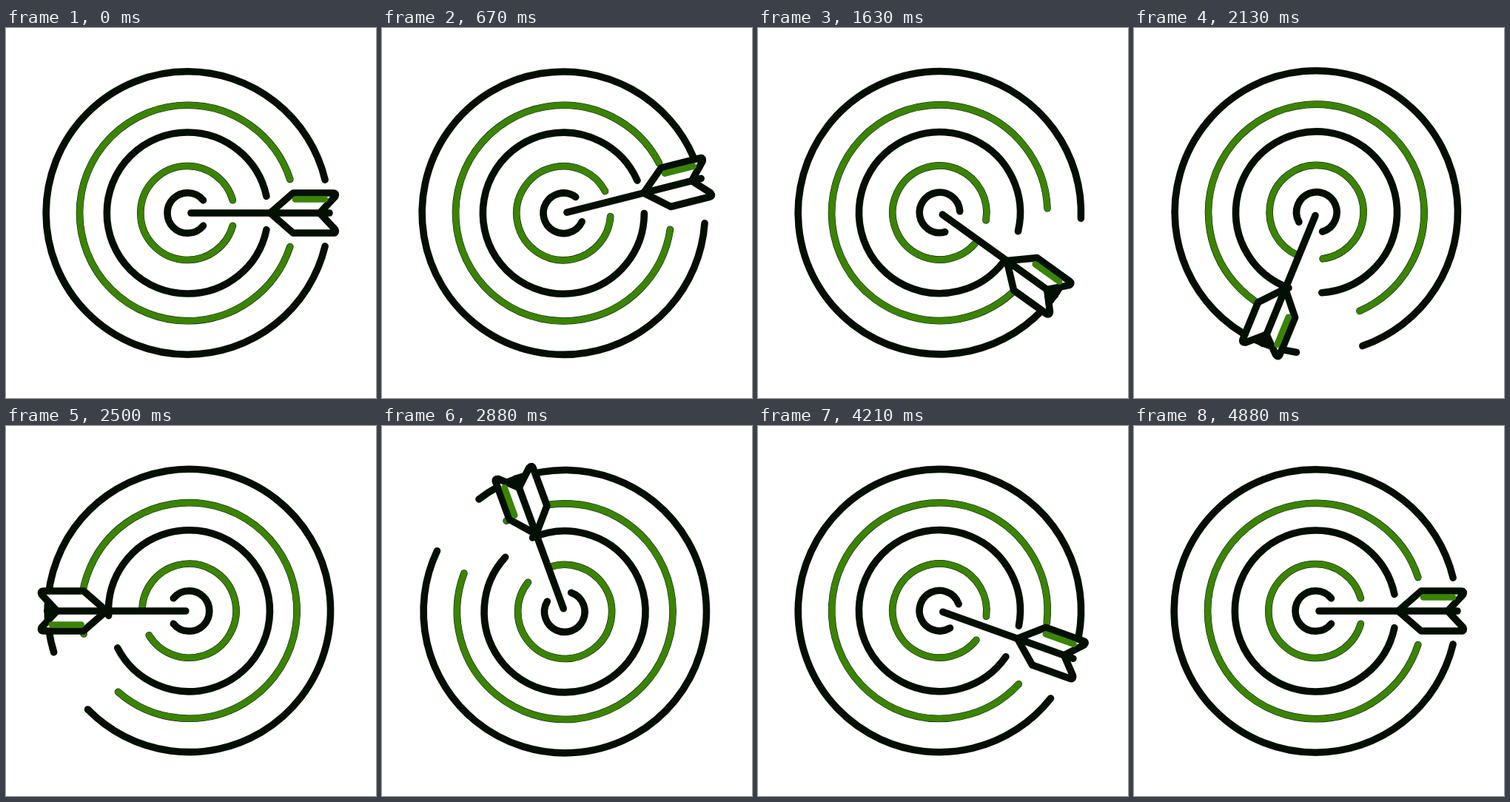
An HTML page without scripts for the animation above (5 s loop, 500 by 500 pixels).

```html
<!DOCTYPE html>
<html lang="en">
<head>
<meta charset="utf-8">
<title>Target and arrow</title>
<style>
  @property --time {
    syntax: "<number>";
    inherits: true;
    initial-value: 0;
  }

  html, body {
    margin: 0;
    width: 100%;
    height: 100%;
    overflow: hidden;
    background: #fff;
  }

  svg {
    display: block;
    width: 100vw;
    height: 100vh;
    fill: none;
    stroke: #020f02;
    stroke-width: 9.6;
    stroke-linecap: round;
    stroke-linejoin: round;
    animation: clock 5s steps(120) -5ms infinite;
  }

  @keyframes clock {
    from { --time: 0; }
    to { --time: 5; }
  }

  /* Wind back, swing past a full turn, settle: three eased phases. */
  .spin {
    --now: (var(--time) - var(--lag));
    --a: clamp(0, var(--now) / .894, 1);
    --b: clamp(0, (var(--now) - .889) / 3.105, 1);
    --c: clamp(0, (var(--now) - 3.994) / .72, 1);
    --back: (var(--a) - .3 * var(--a) * var(--a) * (1 - var(--a)));
    --swing: (var(--b) - .19 * var(--b) * var(--b) * (1 - var(--b)));
    --settle: var(--c);
    transform-origin: 246.4px 250px;
    transform: rotate(calc(1deg * (
      -18 * var(--back) * var(--back) * (3 - 2 * var(--back))
      + 403 * var(--swing) * var(--swing) * (3 - 2 * var(--swing))
      - 25 * var(--settle) * var(--settle) * (3 - 2 * var(--settle))
    )));
  }

  .outer { --lag: .1667; }
  .middle { --lag: .0833; }
  .inner { --lag: 0; }
  .green { stroke: #3b8305; stroke-width: 8.6; }
  .feathers { fill: #fff; }
</style>
</head>
<body>
<svg viewBox="0 0 500 500">
  <!-- Ring lengths are in degrees; each gap is centred on the right. Green rings lie on a thin dark edge. -->
  <g class="spin outer">
    <circle cx="245.3" cy="250" r="191.2" pathLength="360" stroke-dasharray="332.8 27.2" stroke-dashoffset="-13.6"/>
    <circle id="wide" cx="245.3" cy="250" r="145.8" pathLength="360" stroke-dasharray="323.6 36.4" stroke-dashoffset="-18.2"/>
    <use class="green" href="#wide"/>
  </g>
  <g class="spin middle">
    <circle cx="245.3" cy="250" r="109" pathLength="360" stroke-dasharray="336 24" stroke-dashoffset="-12"/>
    <circle id="small" cx="245.3" cy="250" r="63.5" pathLength="360" stroke-dasharray="328 32" stroke-dashoffset="-16"/>
    <use class="green" href="#small"/>
  </g>
  <g class="spin inner">
    <circle cx="245.3" cy="250" r="27.3" pathLength="360" stroke-dasharray="282 78" stroke-dashoffset="-39"/>
    <path class="feathers" d="M357 250L388 223H442Q447 223 444.5 228L424 250L444.5 272Q447 277 442 277H388Z"/>
    <path d="M250 250H437"/>
    <path class="green" d="M391 231.5H431"/>
  </g>
</svg>
</body>
</html>
```
